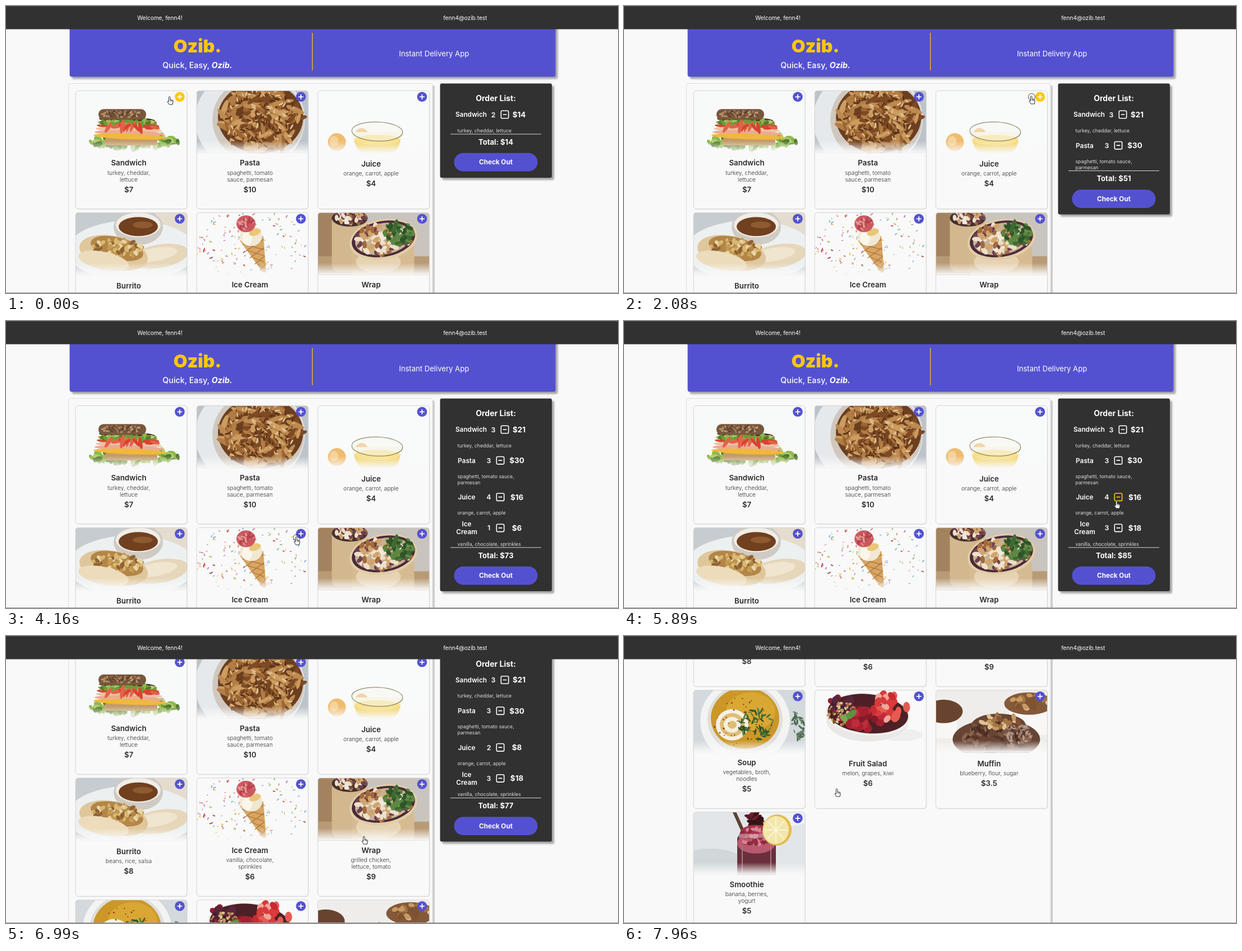
Write an HTML page that moves like this. It is 1092 by 513 pixels and loops after 8 s.

```html
<!DOCTYPE html>
<html lang="en">
<head>
<meta charset="utf-8">
<title>Food order</title>
<style>
html, body { margin: 0; width: 100%; height: 100%; overflow: hidden; background: #f9f9f9; }
svg { display: block; width: 100%; height: 100%; font-family: Inter, "Noto Sans", sans-serif; }
.lift { filter: drop-shadow(4px 4px 1.5px #a6a6a6); }
.card { filter: drop-shadow(1px 1px .5px #e4e4e4); }
</style>
</head>
<body>
<svg id="stage" viewBox="0 0 1092 513"></svg>
<script>
const PURPLE = '#5451d1', YELLOW = '#ffc807', DARK = '#313131', PAPER = '#f9f9f9';
const DURATION = 8000;

const foods = [
  { name: 'Sandwich', price: 7, notes: ['turkey, cheddar,', 'lettuce'], picture: sandwich },
  { name: 'Pasta', price: 10, notes: ['spaghetti, tomato', 'sauce, parmesan'], order: ['spaghetti, tomato sauce,', 'parmesan'], picture: pasta },
  { name: 'Juice', price: 4, notes: ['orange, carrot, apple'], picture: juice },
  { name: 'Burrito', price: 8, notes: ['beans, rice, salsa'], picture: burrito },
  { name: 'Ice Cream', price: 6, notes: ['vanilla, chocolate,', 'sprinkles'], picture: iceCream },
  { name: 'Wrap', price: 9, notes: ['grilled chicken,', 'lettuce, tomato'], picture: wrap },
  { name: 'Soup', price: 5, notes: ['vegetables, broth,', 'noodles'], picture: soup },
  { name: 'Fruit Salad', price: 6, notes: ['melon, grapes, kiwi'], picture: fruitSalad },
  { name: 'Muffin', price: 3.5, notes: ['blueberry, flour, sugar'], picture: muffin },
  { name: 'Smoothie', price: 5, notes: ['banana, berries,', 'yogurt'], picture: smoothie }
];

// Where the cursor rests, and what it taps there; it glides from stop to stop
const stops = [
  { x: 293, y: 169, from: 0, to: 500, food: 0, taps: 1 },
  { x: 510, y: 169, from: 780, to: 1800, food: 1, taps: 3 },
  { x: 728, y: 168, from: 1960, to: 2800, food: 2, taps: 4 },
  { x: 519, y: 393, from: 3100, to: 4150, food: 4, taps: 1 },
  { x: 519, y: 393, from: 4200, to: 4700, food: 4, taps: 2 },
  { x: 868, y: 385, from: 5250, to: 5400 },
  { x: 880, y: 328, from: 5800, to: 6320, food: 2, taps: 2, remove: true },
  { x: 640, y: 365, from: 6990, to: 7240, scroll: 115.5 },
  { x: 718, y: 329, from: 7560, to: 7600, scroll: 404 },
  { x: 381, y: 280, from: 7960, to: DURATION, scroll: 490.5 }
];
const taps = stops.flatMap(s => Array.from({ length: s.taps || 0 }, (_, k) => ({
  time: s.from + (s.to - s.from) * (k + .9) / s.taps, food: s.food, change: s.remove ? -1 : 1
})));

// Drawing helpers
const rect = (x, y, w, h, fill, r = 0, more = '') =>
  `<rect x="${x}" y="${y}" width="${w}" height="${h}" rx="${r}" fill="${fill}" ${more}/>`;
const oval = (x, y, rx, ry, fill, turn = 0, more = '') =>
  `<ellipse cx="${x}" cy="${y}" rx="${rx}" ry="${ry}" fill="${fill}" transform="rotate(${turn} ${x} ${y})" ${more}/>`;
const shape = (d, fill, more = '') => `<path d="${d}" fill="${fill}" ${more}/>`;
const line = (d, color, w = 1) => `<path d="${d}" fill="none" stroke="${color}" stroke-width="${w}" stroke-linecap="round"/>`;
const text = (x, y, s, size, weight = 400, fill = '#fff', anchor = 'middle') =>
  `<text x="${x}" y="${y}" font-size="${size}" font-weight="${weight}" fill="${fill}" text-anchor="${anchor}">${s}</text>`;
const repeat = (n, f) => Array.from({ length: n }, (_, i) => f(i)).join('');
const backdrop = color => rect(0, 0, 199, 112, color);

let seed = 7;
const random = () => (seed = seed * 16807 % 2147483647) / 2147483647;

// Random small ovals inside a larger oval
const scatter = (n, x, y, rx, ry, w, h, colors) => repeat(n, () => {
  const a = random() * 2 * Math.PI, d = Math.sqrt(random()), size = .7 + random() * .6;
  return oval((x + rx * d * Math.cos(a)).toFixed(1), (y + ry * d * Math.sin(a)).toFixed(1),
    (w * size).toFixed(1), (h * size).toFixed(1), colors[Math.floor(random() * colors.length)], Math.floor(random() * 180));
});

const lettuce = ['#6f9a35', '#8fb84c', '#527a2a', '#b3cd74'];
const herbs = ['#3f6a32', '#2f5429', '#5d8743'];
const nuts = ['#c79a62', '#a37444', '#e0c294', '#7d5332'];
const crumbs = ['#573629', '#7a5340', '#4a2c21', '#8b6551'];
const berries = ['#a4202f', '#bd2c3b', '#851a29'];

function sandwich() {
  const layers = ['#4a2c25', '#7fa53e', '#d6432f', '#ecc2a6', '#e9ac92', '#f0b83c'];
  return backdrop('#f8f9f9') + scatter(110, 105, 91, 78, 11, 7, 4, lettuce) + rect(52, 84, 94, 14, '#c39c6c', 5) +
    repeat(layers.length, i => oval(92 + i, 52 + i * 6, 50 + i * 3, 5, layers[i], 2)) +
    scatter(35, 93, 58, 54, 4, 6, 3, lettuce) + scatter(14, 96, 65, 56, 3, 10, 3, ['#d8432f', '#e2624a']) +
    rect(41, 33, 85, 19, '#79573d', 9) + scatter(90, 84, 42, 38, 7, 2, 1, ['#a5805b', '#5b3d2a', '#c4a27a']);
}

function pasta() {
  return backdrop('#bcc3c9') + oval(95, 52, 98, 90, '#e6e9ec') + oval(110, 52, 82, 76, '#d0c8be') + oval(114, 48, 76, 64, '#6b3f20') +
    scatter(150, 114, 48, 68, 60, 14, 4, ['#b27d45', '#9c6532', '#cc9c60', '#7d4a24', '#bd8a50']) +
    scatter(110, 112, 50, 66, 56, 4, 1.2, ['#5a3218', '#e2c595']);
}

function juice() {
  return backdrop('#f9fafa') + oval(34, 92, 16, 16, '#efbc6e') + oval(29, 90, 8, 9, '#f4d29a') + oval(78, 80, 12, 13, '#edb15e') +
    shape('M61 74Q64 112 84 111H128Q148 112 151 74Z', '#f7f3e2') + shape('M65 88Q70 111 84 111H128Q144 111 147 88Z', '#f3d469') +
    oval(106, 88, 41, 9, '#f7e08e') + oval(106, 73, 45.5, 17, '#f8f8f2', 2, 'fill-opacity=".5" stroke="#77754e"');
}

function burrito() {
  return backdrop('#c6ccd0') + oval(190, 12, 50, 40, '#e4dccf') + oval(100, 68, 115, 54, '#edf0f1') +
    oval(112, 26, 44, 32, '#cfcac4') + oval(112, 22, 40, 22, '#f1ede7') + oval(112, 25, 35, 17, '#70401f') + oval(120, 22, 18, 6, '#8f5a30') +
    oval(150, 78, 52, 21, '#e6d6ba', -10) + oval(142, 75, 40, 12, '#f0e5cf', -10) +
    oval(68, 72, 62, 30, '#dfc79c', 12) + oval(74, 64, 48, 20, '#b38648', 14) +
    scatter(75, 74, 64, 44, 17, 5, 3, ['#d9b872', '#c29a52', '#8f6233', '#ead6a8']) + oval(50, 86, 46, 16, '#ecdcbc', 12);
}

function iceCream() {
  return backdrop(PAPER) + scatter(130, 100, 55, 105, 62, 2.2, .9, ['#e58a7b', '#86b9cf', '#e6c15a', '#9cc08c', '#c48ab5', '#b34a4a']) +
    shape('M77 50L119 42L124 106Q120 109 117 106Z', '#d8a563') +
    repeat(4, i => line(`M${82 + i * 9} ${56 + i * 12}L120 ${66 + i * 11}M${119 + i} ${48 + i * 15}L${86 + i * 9} ${70 + i * 11}`, '#a87238', 1.2)) +
    oval(97, 42, 20, 18, '#f1e8d3') + oval(90, 46, 9, 12, '#fbf6ea') + oval(104, 35, 11, 6, '#e8c778', -20) +
    oval(88, 20, 17, 15, '#cb5a60') + scatter(24, 88, 20, 14, 11, 3, 1.5, ['#b5434c', '#e39a96']);
}

function wrap() {
  const filling = ['#f0e8da', '#d1a46d', '#a2693d', '#ede0c9', '#6d4050'];
  return backdrop('#c9c4bd') + rect(0, 0, 70, 112, '#a3835f') + rect(0, 78, 199, 34, '#b89b76') +
    rect(25, 4, 62, 102, '#d2b78f', 12) + oval(57, 10, 32, 15, '#45302f') + scatter(45, 57, 9, 29, 12, 5, 3, filling) +
    rect(60, 45, 112, 90, '#d6bb92', 24) + oval(108, 88, 40, 20, '#e6d3b3') +
    oval(117, 48, 61, 36, '#e2cda8', -10) + oval(117, 47, 57, 32, '#4b2b38', -10) + oval(117, 47, 51, 28, '#c8b294', -10) +
    scatter(100, 115, 48, 48, 26, 6, 3.5, filling) + scatter(60, 145, 36, 25, 20, 5, 3, herbs);
}

function soup() {
  return backdrop('#d3d9dc') + oval(92, 55, 80, 76, '#f2f3f2') + oval(92, 52, 67, 62, '#dfdedb') + oval(92, 50, 61, 55, '#cb9727') +
    oval(102, 38, 44, 34, '#d9a733') + repeat(4, i => oval(69, 62, 29 - i * 7, 28 - i * 7, i % 2 ? '#dfbd72' : '#f5f0e1')) +
    scatter(60, 112, 62, 30, 28, 5, 1.4, herbs) + scatter(35, 88, 55, 52, 46, 1.3, 1, ['#99351d', '#6f2618']) +
    scatter(26, 187, 62, 10, 26, 5, 1.6, ['#6d8570', '#4f6b54']);
}

function fruitSalad() {
  return backdrop(PAPER) + oval(155, 80, 38, 11, '#eeeeee') + oval(95, 53, 74, 39, '#e9e8e6') + oval(95, 43, 76, 38, '#f1f0ee', 5) +
    oval(95, 42, 72, 35, '#4d2026', 5) + scatter(24, 48, 24, 24, 12, 6, 6, ['#3a2030', '#58253a', '#8d1f32']) +
    scatter(80, 50, 42, 27, 20, 3, 2, nuts) + scatter(28, 88, 52, 42, 18, 8, 8, berries) +
    scatter(28, 134, 30, 30, 22, 9, 6, ['#d93a3c', '#e65a52', '#f0a79a', '#c92b30']) +
    oval(64, 44, 13, 6, '#5f9140', -35) + oval(52, 50, 8, 5, '#79a954', 40);
}

function muffin() {
  return backdrop('#efedeb') + rect(-20, 50, 58, 36, '#f8f7f5', 8) + oval(14, 38, 34, 21, '#68432f') + rect(130, 36, 80, 44, '#f8f7f5', 8) +
    oval(166, 24, 44, 20, '#84593a') + scatter(28, 166, 20, 36, 13, 6, 4, nuts) +
    oval(108, 88, 78, 36, '#674434') + oval(112, 62, 48, 20, '#674434') + scatter(90, 110, 84, 68, 28, 6, 2.5, crumbs) +
    scatter(34, 108, 56, 40, 12, 6, 3.5, nuts) + scatter(40, 146, 80, 28, 18, 4, 1.6, ['#b49b8e', '#977a6c']);
}

function smoothie() {
  return backdrop('#e2e6e8') + oval(30, 95, 65, 30, '#d2d8da') + oval(165, 5, 50, 20, '#f0f3f4') + line('M73 0L90 38', '#5c4132', 6) +
    scatter(24, 109, 16, 14, 15, 8, 3, ['#351317', '#531a22', '#6d2029']) + rect(78, 39, 69, 90, '#69303c', 9) +
    oval(112, 56, 34, 18, '#b95a70') + oval(112, 36, 28, 13, '#a7354c') + scatter(60, 112, 44, 29, 15, 4, 3, ['#c0506a', '#8f2a40', '#d98396']) +
    rect(80, 39, 65, 7, '#d6adb4', 3, 'opacity=".6"') + line('M87 60V108M138 60V108', '#a77580', 2) +
    oval(149, 32, 26, 28, '#e3bd4e', 10) + oval(147, 32, 23, 25, '#f3e6ac', 10) +
    repeat(8, i => line(`M147 32l${20 * Math.cos(i * Math.PI / 4)} ${22 * Math.sin(i * Math.PI / 4)}`, '#fdf8e0', 1.5));
}

function card({ name, price, notes, picture }, i) {
  const x = 124 + i % 3 * 216.2, y = 151.3 + Math.floor(i / 3) * 218, two = notes.length > 1;
  const top = two ? 134 : 135.8;
  return `<g transform="translate(${x} ${y})">` +
    rect(0, 0, 199, 211.5, PAPER, 5, 'class="card"') +
    `<g clip-path="url(#photo)">${picture()}${rect(0, 90, 199, 23, 'url(#fade)')}</g>` +
    rect(0, 0, 199, 211.5, 'none', 5, 'stroke="#d4d4d4"') +
    text(95, top, name, 13.3, 600, '#2b2b2b') +
    notes.map((s, k) => text(95, top + 16.4 + k * 12.3, s, 10.2, 300, '#333')).join('') +
    text(95, top + 35 + (two ? 12.5 : 0), '$' + price, 13.2, 600, '#2b2b2b') +
    `<circle id="add${i}" cx="186" cy="11" r="8.8"/>` + line('M182.3 11H189.7M186 7.3V14.7', '#fff', 1.8) + '</g>';
}

function orderList(counts, hot) {
  let y = 194, rule = 0, total = 0, rows = '';
  foods.forEach(({ name, price, notes, order }, i) => {
    if (!counts[i]) return;
    const lines = order || [notes.join(' ')], extra = (lines.length - 1) * 10.3, sum = price * counts[i];
    const push = name.length > 7 && !name.includes(' ') ? 8 : 0; // a long word widens its column
    const words = name.split(' '), ink = hot === i ? YELLOW : '#fff', box = 882 + push;
    words.forEach((w, k) => rows += text(822 + push, y + 4.3 + (k - (words.length - 1) / 2) * 14, w, 11.8, 600));
    rows += text(861.5 + push, y + 4.5, counts[i], 12.4, 600) + text(911.5 + push / 2, y + 4.9, '$' + sum, 13.4, 700) +
      rect(box - 6.7, y - 6.7, 13.4, 13.4, 'none', 2, `stroke="${ink}" stroke-width="1.6"`) +
      line(`M${box - 2.6} ${y}h5.2`, ink, 1.7);
    lines.forEach((s, k) => rows += text(805.5, y + 31.7 + k * 11, s, 8.7, 400, '#dcdcdc', 'start'));
    total += sum;
    rule = y + 35 + extra;
    y += 55.2 + extra;
  });
  return rect(774.5, 138.5, 199.5, rule - 60.5, DARK, 3, 'class="lift"') + text(874, 170, 'Order List:', 14, 700) + rows +
    rect(793, rule - .5, 162, 1, '#d5d5d5') + text(874, rule + 18.8, 'Total: $' + total, 13, 700) +
    rect(799.5, rule + 33.8, 149, 32.8, PURPLE, 16.4) + text(874, rule + 54.4, 'Check Out', 11.7, 700);
}

const $ = id => document.getElementById(id);
$('stage').innerHTML = `<defs>
  <clipPath id="photo"><path d="M0 111.5V5Q0 0 5 0H194Q199 0 199 5V111.5Z"/></clipPath>
  <linearGradient id="fade" x2="0" y2="1"><stop stop-color="${PAPER}" stop-opacity="0"/><stop offset=".95" stop-color="${PAPER}"/></linearGradient>
  </defs><g id="page">` +
  rect(113.5, 30, 867, 96.5, PURPLE, 4, 'class="lift"') + rect(546, 48, 1.2, 67, YELLOW) +
  text(341.5, 83, 'Ozib.', 32, 900, YELLOW) +
  text(341.5, 111, 'Quick, Easy, <tspan font-weight="700" font-style="italic">Ozib.</tspan>', 14.3, 500) +
  text(763.7, 89.8, 'Instant Delivery App', 13.1) +
  rect(116, 142, 649, 1300, '#cdcdcd', 3) + rect(111.5, 138.5, 649.5, 1300, PAPER, 3, 'stroke="#dcdcdc"') +
  foods.map(card).join('') + '<g id="order"></g></g>' +
  rect(0, 0, 1092, 41.5, DARK) + rect(0, 0, 1092, 1, '#4a4a4a') +
  text(274.5, 25, 'Welcome, fenn4!', 10.1) + text(819.3, 25, 'fenn4@ozib.test', 10.1) +
  rect(0, 512, 1092, 1, '#9a9a9a') +
  '<g id="cursor"><circle id="ring" cx="-.5" cy="-5.5" r="6" fill="none" stroke="#444"/>' +
  shape('M-2.6 2V-5.6a1.3 1.3 0 0 1 2.6 0V-1.4l3.8 .8q1.6 .5 1.4 2.2L4.2 7H-1.8L-5 2.2q.4-1.8 2.4-.2z', '#fff', 'stroke="#2b2b2b" stroke-linejoin="round"') +
  line('M0-1.2V1.4M1.9-.8V1.6M3.6-.4V1.8', '#2b2b2b', .6) + '</g>';

// Cursor place, scroll and hovered food at time t
function pose(t) {
  const i = stops.findLastIndex(s => s.from <= t), a = stops[i], b = stops[i + 1] || a;
  const k = t <= a.to ? 0 : (t - a.to) / (b.from - a.to), e = k * k * (3 - 2 * k);
  const mix = key => (a[key] || 0) + ((b[key] || 0) - (a[key] || 0)) * e;
  return { x: mix('x'), y: mix('y'), scroll: mix('scroll'), hover: t <= a.to ? a : {} };
}

const start = performance.now();
let lastOrder = '';

function draw() {
  const t = (performance.now() - start) % DURATION;
  const { x, y, scroll, hover } = pose(t);
  const counts = foods.map((_, i) => taps.reduce((n, p) => n + (p.food === i && p.time <= t ? p.change : 0), i ? 0 : 2));
  const order = orderList(counts, hover.remove ? hover.food : -1);
  if (order !== lastOrder) $('order').innerHTML = lastOrder = order;
  foods.forEach((_, i) => $('add' + i).setAttribute('fill', hover.food === i && !hover.remove ? YELLOW : PURPLE));
  $('page').setAttribute('transform', `translate(0 ${-scroll})`);
  $('cursor').setAttribute('transform', `translate(${x} ${y})`);
  $('ring').setAttribute('visibility', taps.some(p => Math.abs(p.time - t) < 120) ? 'visible' : 'hidden');
  requestAnimationFrame(draw);
}
draw();
</script>
</body>
</html>
```
